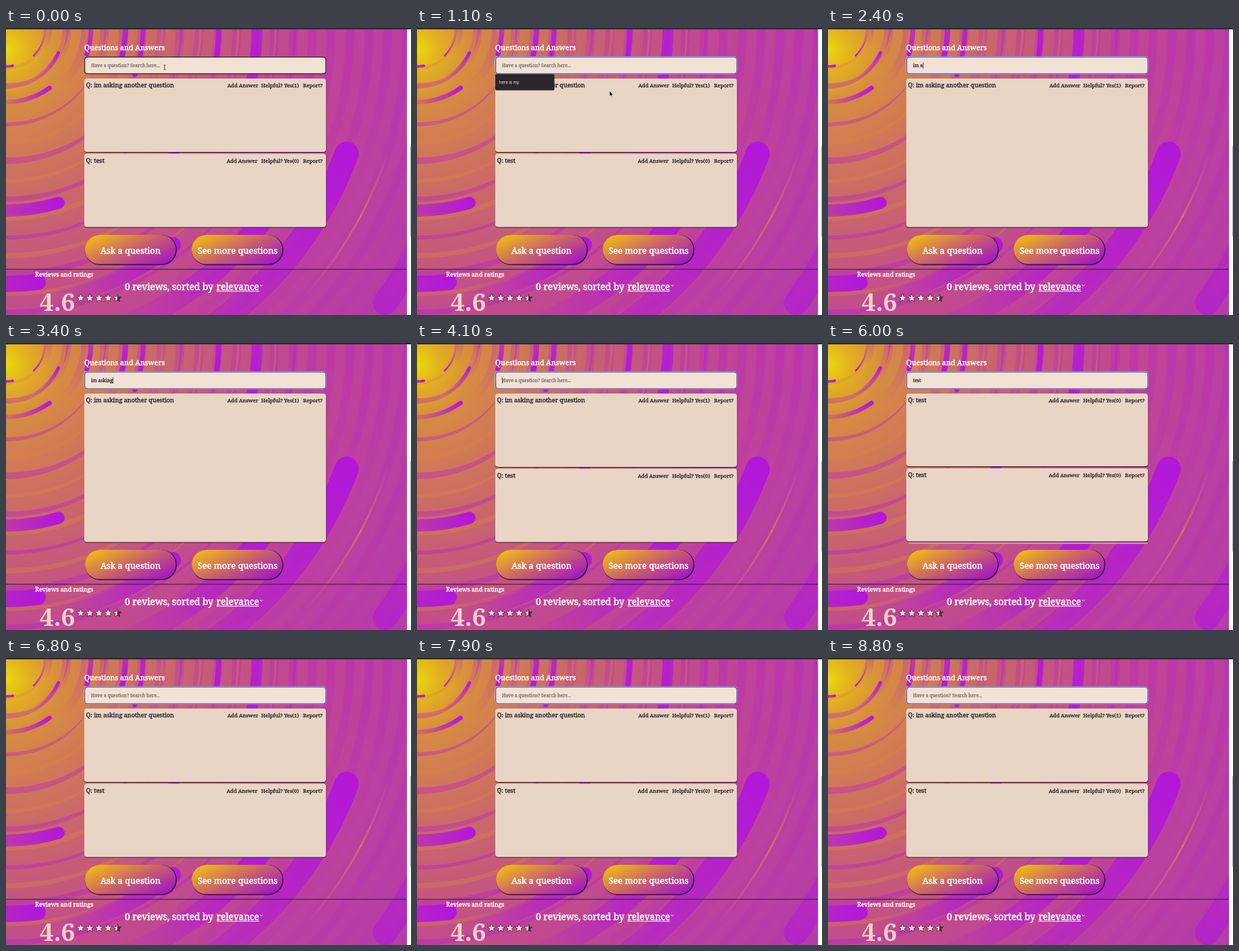
An HTML page with a canvas that plays this animation: 600x426 px, repeating every 8900 ms.

```html
<!DOCTYPE html>
<html lang="en">
<head>
<meta charset="utf-8">
<title>Questions and Answers</title>
<style>
html, body { margin: 0; height: 100%; overflow: hidden; }
canvas { display: block; }
</style>
</head>
<body>
<canvas id="stage" width="600" height="426"></canvas>
<script>
const LOOP = 8900;
const SERIF = '"Noto Serif", serif';
const CREAM = '#e8d5c5', INK = '#2a2028', PURPLE = '178,24,216', ORANGE = '216,134,62';
const stage = document.getElementById('stage').getContext('2d');
const page = document.createElement('canvas');
page.width = 600;
page.height = 426;
let g = page.getContext('2d');

// `heavy` thickens the strokes a little without changing the widths.
function text(str, x, y, size, { color = INK, weight = 400, font = SERIF, heavy = .04 } = {}) {
  g.font = `${weight} ${size}px ${font}`;
  g.fillStyle = g.strokeStyle = color;
  g.fillText(str, x, y);
  if (!heavy) return;
  g.lineWidth = size * heavy;
  g.lineJoin = 'round';
  g.strokeText(str, x, y);
}

function box(x, y, w, h, r, fill) {
  g.beginPath();
  g.roundRect(x, y, w, h, r);
  g.fillStyle = fill;
  g.fill();
}

// Arc around the page corner: solid at angle `head`, fading out at `tail` (degrees).
function streak(r, width, head, tail, rgb = PURPLE, alpha = 1) {
  const rad = Math.PI / 180;
  const fade = g.createConicGradient(-Math.PI / 2, 0, 0);
  fade.addColorStop((head + 90) / 360, `rgba(${rgb},${alpha})`);
  fade.addColorStop((tail + 90) / 360, `rgba(${rgb},0)`);
  g.beginPath();
  g.arc(0, 0, r, Math.min(head, tail) * rad, Math.max(head, tail) * rad);
  g.strokeStyle = fade;
  g.lineWidth = width;
  g.lineCap = 'round';
  g.stroke();
}

// Sliver between two offset circles, thick at the left edge and tapering upwards.
function crescent(r, thickness, rgb, alpha) {
  g.beginPath();
  g.arc(0, 0, r, 0, 7);
  g.arc(thickness * .5, -thickness, r, 0, 7);
  g.fillStyle = `rgba(${rgb},${alpha})`;
  g.fill('evenodd');
}

function drawBackground() {
  const glow = g.createRadialGradient(0, 32, 0, 0, 32, 720);
  ['#ecd80c', '#e2ae22', '#d78c40', '#d27c54', '#cb6a66', '#c65a7a', '#c24c8c', '#c04496', '#bc40a0', '#b63ca8']
    .forEach((c, i) => glow.addColorStop([0, .05, .11, .19, .3, .42, .54, .66, .8, 1][i], c));
  g.fillStyle = glow;
  g.fillRect(0, 0, 600, 426);

  for (let r = 62, i = 0; r < 760; r += 28, i++) {
    streak(r, 13, -5, 30 + i % 3 * 8, PURPLE, .3);
    if (r < 440) crescent(r, 6 + i % 3 * 2, i % 2 ? PURPLE : ORANGE, .35);
    else streak(r, 14, 55, 20, PURPLE, .15);
  }

  [[57, 4, 80, 130], [58, 2.5, 45, 0], [86, 5, 25.4, 62], [110, 6.5, 54, 100],
   [126, 7, 18, -30], [177, 8, 14, -40], [203, 7, 20, -40],
   [315, 8, 10, -40], [372, 16, 25, -60], [271, 18, 73.3, 115],
   [311, 14, 36.5, 60], [380, 24, 82.9, 120], [406, 24, 52.5, 80],
   [475, 32, 36, 70], [538, 36, 20.3, 75]].forEach(a => streak(...a));
  streak(694, 36, 36, 10, PURPLE, .6);
  streak(595, 3, 28, 18, ORANGE, .7);
  streak(595, 3, 28, 42, ORANGE, .7);
}

function drawButton(x, w, label, textX) {
  box(x, 307, w, 45, 22.5, '#2c1730');
  const cx = x + w / 2;
  const fill = g.createLinearGradient(cx - 20, 286, cx + 20, 373);
  fill.addColorStop(.05, '#f0bc14');
  fill.addColorStop(.5, '#c8606c');
  fill.addColorStop(.95, '#a010cc');
  box(x, 307, w - 1.5, 43.6, 21.8, fill);
  text(label, textX, 335, 12.8, { color: '#fff' });
}

function drawStar(x, y, half) {
  g.beginPath();
  for (let i = 0; i < 10; i++) {
    const a = i * Math.PI / 5 - Math.PI / 2, r = i % 2 ? 2.5 : 5.7;
    g.lineTo(x + r * Math.cos(a), y + r * Math.sin(a));
  }
  g.closePath();
  g.strokeStyle = INK;
  g.lineWidth = 1.2;
  g.stroke();
  g.save();
  g.clip();
  g.fillStyle = '#4a3040';
  g.fillRect(x - 6, y - 6, 12, 12);
  g.fillStyle = '#f0dccb';
  g.fillRect(x - 6, y - 6, half ? 6 : 12, 12);
  g.restore();
}

function drawPage() {
  const white = { color: '#fff' };
  drawBackground();
  text('Questions and Answers', 116, 33, 10.7, white);
  drawButton(117, 136, 'Ask a question', 140);
  drawButton(275, 136, 'See more questions', 284);

  g.fillStyle = INK;
  g.fillRect(0, 357.6, 594, 1);
  text('Reviews and ratings', 43, 369, 9, white);
  text('4.6', 50, 419.5, 37, { color: '#ecd3c6', weight: 700, heavy: 0 });
  for (let i = 0; i < 5; i++) drawStar(110.5 + i * 13.6, 401, i === 4);
  text('0 reviews, sorted by', 176, 388.5, 13.8, white);
  text('relevance', 312, 388.5, 13.5, white);
  g.fillStyle = '#fff';
  g.fillRect(312, 390.2, 63, 1);
  g.beginPath();
  g.moveTo(376.5, 381.5);
  g.lineTo(378.3, 383.3);
  g.lineTo(380.1, 381.5);
  g.strokeStyle = '#fff';
  g.lineWidth = .9;
  g.stroke();

  g.fillStyle = '#fff';
  g.fillRect(594, 0, 6, 426);
  box(599, 175, 3, 135, 1.5, '#a8a8a8');
  g.fillStyle = '#2d2b30';
  g.fillRect(0, 0, 600, 2);
}

function drawCard(y, h, title, votes) {
  box(116, y + .6, 358.3, h, 4, INK);
  box(116, y, 358, h - .5, 4, CREAM);
  text('Q: ' + title, 118.5, y + 13, 9.1);
  text('Add Answer', votes ? 328 : 327, y + 13, 7.8);
  text(`Helpful? Yes(${votes})`, 378, y + 13, 7.9);
  text('Report?', 440, y + 13, 7.9);
}

// Moments at which the search text changes; the first entry is the focus click.
const edits = [[400, '']];
function type(word, start, step) {
  for (let i = 1; i <= word.length; i++) edits.push([start + i * step, word.slice(0, i)]);
}
type('im asking', 1900, 120);
edits.push([3900, '']);
type('test', 5000, 100);
edits.push([6250, '']);

function drawSearch(query, focused, caret) {
  if (focused) box(115.5, 42, 359, 26.8, 5, '#e6dcf0');
  box(116, 42.5, 358.3, 26, 4.5, focused ? '#4458b4' : INK);
  box(117.2, 43.7, 356, 23.6, 3.6, '#f2e2d4');
  text(query || 'Have a question? Search here...', 126, 58.3, 6.9, { color: query ? INK : '#756d6c' });
  if (caret) {
    const x = 126.2 + (query ? g.measureText(query).width : 0);
    g.fillStyle = INK;
    g.fillRect(x, 51, .8, 9);
  }
}

function drawPointer(t) {
  if (t < 500) {
    g.fillStyle = INK;
    g.fillRect(234.6, 55, .8, 7);
    g.fillRect(233.6, 54.6, 2.8, .6);
    g.fillRect(233.6, 61.6, 2.8, .6);
    return;
  }
  const p = Math.min(1, (t - 500) / 500), ease = p * p * (3 - 2 * p);
  g.save();
  g.translate(235 + 50.5 * ease, 58 + 36 * ease);
  g.beginPath();
  [[0, 0], [0, 6.6], [1.5, 5.3], [2.5, 7.6], [3.6, 7.1], [2.6, 4.9], [4.6, 4.8]]
    .forEach(q => g.lineTo(...q));
  g.closePath();
  g.strokeStyle = '#fff';
  g.lineWidth = .9;
  g.stroke();
  g.fillStyle = '#111';
  g.fill();
  g.restore();
}

function draw(t) {
  const [since, query] = edits.findLast(e => e[0] <= t) || [0, ''];
  const focused = t >= 400;
  g = stage;
  g.drawImage(page, 0, 0);

  if (query.length > 2 && query[0] === 'i') {
    drawCard(75, 221, 'im asking another question', 1);
  } else if (query.length > 2) {
    box(119, 296, 354, 2.2, 1, '#e08cba');
    drawCard(75, 108.5, 'test', 0);
    drawCard(186, 109, 'test', 0);
  } else {
    drawCard(75, 109.5, 'im asking another question', 1);
    drawCard(186.5, 109.5, 'test', 0);
  }

  drawSearch(query, focused, focused && (t - since) % 1000 < 500);
  if (t >= 500 && t < 1900) {
    box(116, 68.5, 88, 24.5, 2, 'rgba(30,20,25,.4)');
    box(116, 68.5, 87.3, 23.8, 2, '#2b272b');
    text('here is my', 122, 82.6, 6, { color: '#f0f0f0', font: 'Inter, sans-serif', heavy: 0 });
  }
  if (t < 2000) drawPointer(t);
}

drawPage();
(function tick() {
  draw(performance.now() % LOOP);
  requestAnimationFrame(tick);
})();
</script>
</body>
</html>
```
